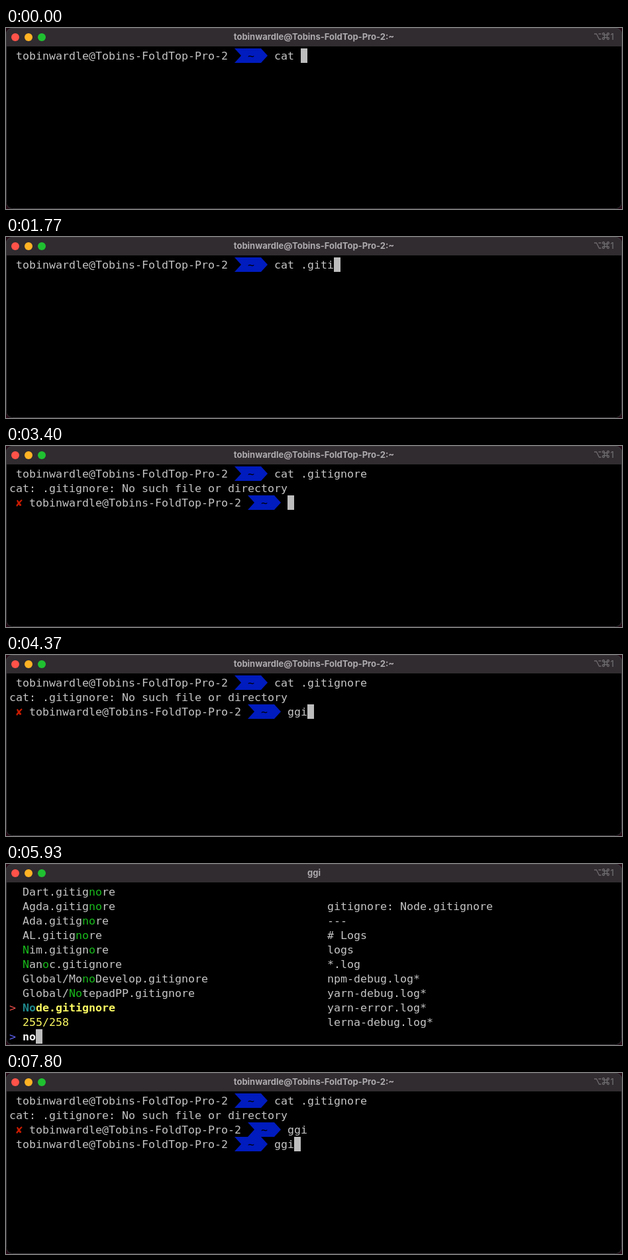
These frames come from a looping animation (930x275 px, 8000 ms). An HTML page:

```html
<!DOCTYPE html>
<html lang="en">
<head>
<meta charset="utf-8">
<title>Terminal</title>
<style>
  html, body { margin: 0; width: 100%; height: 100%; overflow: hidden; background: #260a16; }
  svg { display: block; width: 930px; height: 275px; }
  #screen text { font: 16.61px "DejaVu Sans Mono", "Liberation Mono", monospace; }
  #screen text.bold { font-weight: 700; }
  .bar { font: 700 13px Inter, Roboto, sans-serif; }
</style>
</head>
<body>
<svg viewBox="0 0 930 275">
  <rect width="930" height="275" rx="9" fill="#000"/>
  <path d="M0 28V9a9 9 0 0 1 9-9h912a9 9 0 0 1 9 9v19z" fill="#302c30"/>
  <rect x=".5" y=".5" width="929" height="274" rx="9" fill="none" stroke="#3c393d"/>
  <circle cx="14" cy="14" r="6" fill="#ff5249"/>
  <circle cx="34" cy="14" r="6" fill="#ffb324"/>
  <circle cx="54" cy="14" r="6" fill="#20c131"/>
  <text id="title" class="bar" x="465" y="18" text-anchor="middle" fill="#aeabaf"></text>
  <g fill="none" stroke="#6d6a6e" stroke-width="1.3">
    <path d="M888 9h3.5l4 8h3M894.500 9h4"/>
    <path d="M903.500 10.500h4v4h-4zM903.500 10.500h-1.500a1.500 1.500 0 1 1 1.500-1.500zM907.500 10.500v-1.500a1.500 1.500 0 1 1 1.500 1.500zM907.500 14.500h1.500a1.500 1.500 0 1 1-1.500 1.500zM903.500 14.500v1.500a1.500 1.500 0 1 1-1.500-1.500z"/>
  </g>
  <text class="bar" x="912.500" y="18" fill="#6d6a6e" style="font-weight:500">1</text>
  <g id="screen"></g>
</svg>
<script>
const LOOP = 8000;
const CELL = 10, LINE = 22, LEFT = 5, TOP = 31;
const HOST = 'tobinwardle@Tobins-FoldTop-Pro-2';
const C = {
  text: '#c4c4c4', cursor: '#bdbdbd', blue: '#001bbe', red: '#c91b00', green: '#19b91c',
  yellow: '#fcfa62', teal: '#1f878b', pointer: '#f0504c', prompt: '#5f63f5', white: '#fff'
};

// Moments at which keys are pressed or the screen switches, in ms.
const CAT_KEYS = [450, 1100, 1260, 1420, 1580, 1800, 1950, 2100, 2250, 2400];
const GGI_KEYS = [3640, 3800, 3960];
const NODE_KEYS = [5730, 5890, 6050, 6210];
const AGAIN_KEYS = [7730, 7765, 7800];
const CAT_RUN = 2920, GGI_RUN = 4520, LIST_OPEN = 4750, PREVIEW_OPEN = 4920;
const LIST_CLOSE = 6720, SHELL_BACK = 6880;

const nodePreview = ['Node.gitignore', '# Logs', 'logs', '*.log', 'npm-debug.log*',
  'yarn-debug.log*', 'yarn-error.log*', 'lerna-debug.log*'];

// Best match first; brackets mark the matched letters.
const results = {
  '': {
    count: 258,
    items: ['.git', '.github/PULL_REQUEST_TEMPLATE.md', 'AL.gitignore', 'Actionscript.gitignore',
      'Ada.gitignore', 'Agda.gitignore', 'Android.gitignore', 'AppEngine.gitignore',
      'AppceleratorTitanium.gitignore'],
    preview: ['.git', 'gitdir: ../.git/modules/gitignore', '', '---']
  },
  n: {
    count: 256,
    items: ['[N]im.gitignore', '[N]ode.gitignore', '[N]anoc.gitignore', 'Global/[N]inja.gitignore',
      'Global/[N]etBeans.gitignore', 'Global/[N]otepadPP.gitignore', 'community/[N]WJS.gitignore',
      'AL.gitig[n]ore', 'Ada.gitig[n]ore'],
    preview: ['Nim.gitignore', 'nimcache/', 'nimblecache/', 'htmldocs/']
  },
  no: {
    count: 255,
    items: ['[No]de.gitignore', 'Global/[No]tepadPP.gitignore', 'Global/Mo[no]Develop.gitignore',
      '[N]an[o]c.gitignore', '[N]im.gitign[o]re', 'AL.gitig[no]re', 'Ada.gitig[no]re',
      'Agda.gitig[no]re', 'Dart.gitig[no]re'],
    preview: nodePreview
  },
  nod: {
    count: 6,
    items: ['[Nod]e.gitignore', 'Global/Mo[noD]evelop.gitignore', 'A[n]dr[o]i[d].gitignore',
      'Global/[No]tepa[d]PP.gitignore', 'commu[n]ity/PHP/C[od]eSniffer.gitignore',
      'commu[n]ity/JavaScript/C[o]r[d]ova.gitignore'],
    preview: nodePreview
  },
  node: {
    count: 6,
    items: ['[Node].gitignore', 'Global/Mo[noDe]velop.gitignore', 'A[n]dr[o]i[d].gitignor[e]',
      'Global/[No]tepa[d]PP.gitignor[e]', 'commu[n]ity/PHP/C[ode]Sniffer.gitignore',
      'commu[n]ity/JavaScript/C[o]r[d]ova.gitignor[e]'],
    preview: nodePreview
  }
};

const x = col => LEFT + col * CELL;
const y = row => TOP + row * LINE;
const typed = (text, keys, t) => text.slice(0, keys.filter(k => t >= k).length);

function write(col, row, text, color = C.text, bold = false) {
  return `<text x="${x(col)}" y="${y(row) + 17}" fill="${color}"${bold ? ' class="bold"' : ''}>${text}</text>`;
}

function cursor(col, row) {
  return `<rect x="${x(col)}" y="${y(row)}" width="${CELL}" height="${LINE}" fill="${C.cursor}"/>`;
}

function marked(col, row, text, color, hit, bold) {
  return text.split(/[\[\]]/).map((part, i) => {
    const piece = part && write(col, row, part, i % 2 ? hit : color, bold);
    col += part.length;
    return piece;
  }).join('');
}

function promptLine(row, command, { failed = false, active = false } = {}) {
  const start = failed ? 3 : 1;
  const flag = start + HOST.length + 1;
  return (failed ? write(1, row, '✘', C.red) : '') +
    write(start, row, HOST) +
    `<path d="M${x(flag)} ${y(row)}h40l10 11l-10 11h-40l10-11z" fill="${C.blue}"/>` +
    write(flag + 2, row, '~', '#000') +
    write(flag + 6, row, command) +
    (active ? cursor(flag + 6 + command.length, row) : '');
}

function shell(t) {
  const catRan = t >= CAT_RUN, ggiRan = t >= GGI_RUN;
  let out = promptLine(0, 'cat ' + typed('.gitignore', CAT_KEYS, t), { active: !catRan });
  if (catRan) {
    out += write(0, 1, 'cat: .gitignore: No such file or directory') +
      promptLine(2, typed('ggi', GGI_KEYS, t), { failed: true, active: !ggiRan });
  }
  if (t >= SHELL_BACK) out += promptLine(3, typed('ggi', AGAIN_KEYS, t), { active: true });
  else if (ggiRan) out += cursor(0, 3);
  return out;
}

function finder(t) {
  const query = typed('node', NODE_KEYS, t);
  const { count, items, preview } = results[query];
  let out = items.map((item, i) => i
    ? marked(2, 8 - i, item, C.text, C.green)
    : marked(2, 8, item, C.yellow, C.teal, true)).join('');
  out += write(0, 8, '&gt;', C.pointer) + write(2, 9, count + '/258', C.yellow) +
    write(0, 10, '&gt;', C.prompt) + write(2, 10, query, C.white, true) +
    cursor(2 + query.length, 10);
  if (t >= PREVIEW_OPEN) {
    const [name, ...lines] = preview;
    out += ['gitignore: ' + name, '---', ...lines]
      .map((line, i) => write(48, i + 1, line)).join('');
  }
  return out;
}

const screenNode = document.getElementById('screen');
const titleNode = document.getElementById('title');
let shown = '';

function render(t) {
  const listing = t >= LIST_OPEN && t < LIST_CLOSE;
  const running = t >= GGI_RUN && t < SHELL_BACK;
  const markup = listing ? finder(t) : shell(t);
  titleNode.textContent = running ? 'ggi' : HOST + ':~';
  if (markup !== shown) screenNode.innerHTML = shown = markup;
}

const begin = performance.now();
function tick() {
  render((performance.now() - begin) % LOOP);
  requestAnimationFrame(tick);
}
tick();
</script>
</body>
</html>
```
